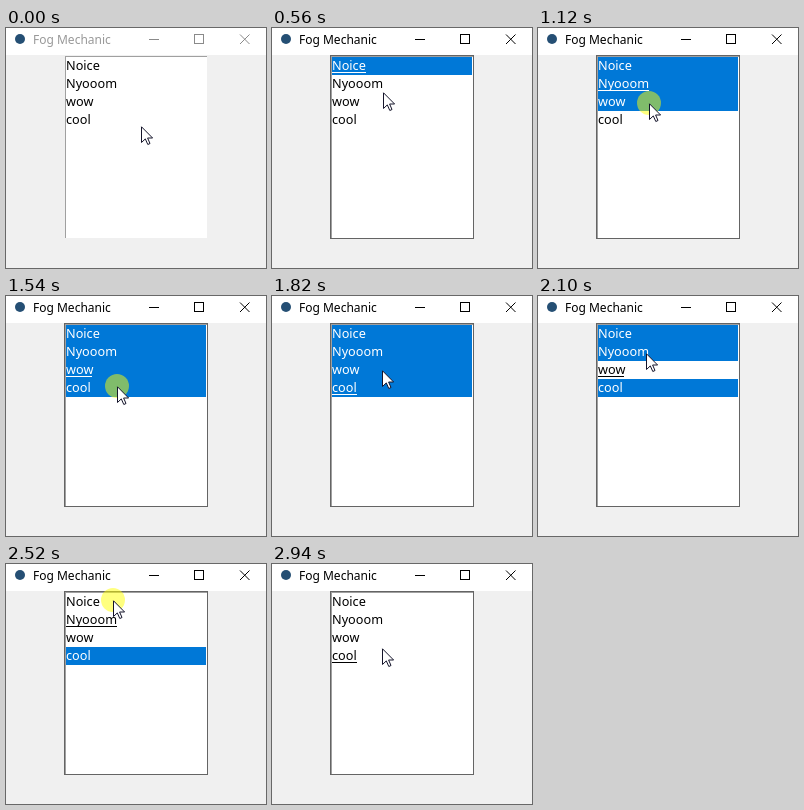
Recreate the animation shown at these times as an HTML page. Size 260 px wide and 240 px high, loop 3.08 s.

```html
<!DOCTYPE html>
<html lang="en">
<head>
<meta charset="utf-8">
<title>Listbox selection</title>
<style>
  html, body { margin: 0; width: 100%; height: 100%; overflow: hidden; background: #f0f0f0; }
  svg { display: block; width: 260px; height: 240px; }
  text { font-family: "Noto Sans", "Open Sans", sans-serif; white-space: pre; }
  .row text { font-size: 12.7px; }
  .row .fill { fill: none; }
  .row .line { visibility: hidden; }
  .row.selected .fill { fill: #0078d7; }
  .row.selected { --ink: #fff; }
  .row text, .row .line { fill: var(--ink, #000); }
  .row.active .line { visibility: visible; }
  rect, .buttons { shape-rendering: crispEdges; }
  .title { font-size: 12px; fill: #999; }
  .buttons { fill: none; stroke: #8a8a8a; }
  .buttons .close { shape-rendering: auto; }
  .focus { fill: #f0f0f0; }
  .focused .title { fill: #000; }
  .focused .buttons { stroke: #000; }
  .focused .focus { fill: #646464; }
</style>
</head>
<body>
<svg id="stage" viewBox="0 0 260 240">
  <rect width="260" height="240" fill="#f0f0f0"/>
  <rect width="260" height="27" fill="#fff"/>
  <circle cx="14" cy="11" r="5" fill="#254f74"/>
  <text class="title" x="27" y="16">Fog Mechanic</text>
  <g class="buttons">
    <path d="M143 11.5H153M188.5 6.5H197.5V15.5H188.5Z"/>
    <path class="close" d="M234 6.5L243.5 16M243.5 6.5L234 16"/>
  </g>

  <rect class="focus" x="58" y="27" width="144" height="184"/>
  <rect x="59" y="28" width="142" height="182" fill="#a0a0a0"/>
  <rect x="60" y="29" width="141" height="181" fill="#fff"/>
  <g id="rows"></g>

  <g id="pointer">
    <circle id="halo" r="12" fill="#ff0" fill-opacity=".5"/>
    <path d="M.5 .8V16.5L4.3 12.9L6.8 18.5L9 17.5L6.6 12H11.6Z" fill="#fff" stroke="#14142a" stroke-linejoin="round"/>
  </g>
</svg>
<script>
const STEP = 140;
const ROW_HEIGHT = 18;
const items = [["Noice", 34], ["Nyooom", 51], ["wow", 26], ["cool", 25]];

// Each step: pointer x, pointer y, selected rows, underlined row, button held
const steps = [
  [135, 98, "", -1],
  [117, 58, "", -1],
  [92, 38, "", -1],
  [122, 75, "0", 0],
  [111, 64, "0", 0],
  [111, 64, "0", 0],
  [111, 64, "01", 1],
  [111, 70, "01", 1],
  [111, 75, "012", 1, true],
  [111, 76, "012", 2],
  [111, 90, "012", 2],
  [111, 90, "0123", 2, true],
  [110, 77, "0123", 3],
  [110, 74, "0123", 3],
  [109, 77, "013", 3, true],
  [108, 57, "013", 2],
  [107, 54, "03", 2, true],
  [107, 42, "03", 1],
  [107, 36, "3", 1, true],
  [108, 64, "3", 0],
  [110, 88, "", 0, true],
  [110, 84, "", 3]
];

const byId = id => document.getElementById(id);
const stage = byId("stage");
const pointer = byId("pointer");
const halo = byId("halo");

byId("rows").innerHTML = items.map(([label, width], i) => `
  <g class="row" transform="translate(60 ${29 + i * ROW_HEIGHT})">
    <rect class="fill" width="140" height="${ROW_HEIGHT}"/>
    <text y="13">${label}</text>
    <rect class="line" y="15" width="${width}" height="1"/>
  </g>`).join("");
const rows = [...document.querySelectorAll(".row")];

function show([x, y, selected, active, held = false]) {
  stage.classList.toggle("focused", active >= 0);
  rows.forEach((row, i) => {
    row.classList.toggle("selected", selected.includes(i));
    row.classList.toggle("active", i === active);
  });
  pointer.setAttribute("transform", `translate(${x} ${y})`);
  halo.setAttribute("visibility", held ? "visible" : "hidden");
}

let start, current = 0;
show(steps[0]);

function tick(now) {
  start ??= now;
  const index = Math.floor((now - start) / STEP) % steps.length;
  if (index !== current) show(steps[current = index]);
  requestAnimationFrame(tick);
}
requestAnimationFrame(tick);
</script>
</body>
</html>
```
